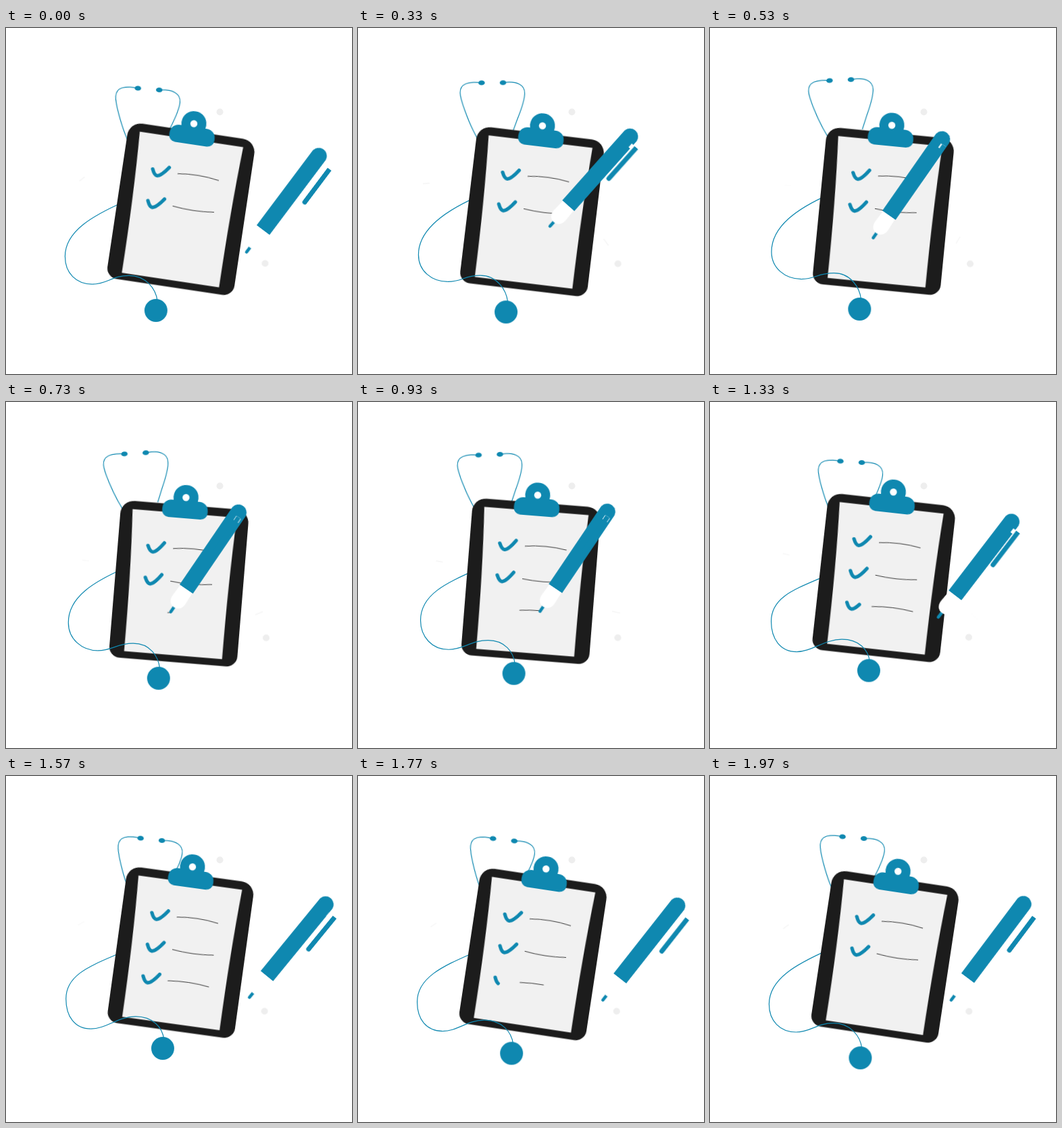
These frames come from a looping animation (512 by 512 pixels, 2000 ms). An HTML page without scripts:

```html
<!DOCTYPE html>
<html lang="en">
<head>
<meta charset="utf-8">
<title>Medical checklist</title>
<style>
@property --x { syntax: "<length>"; inherits: true; initial-value: 380px; }
@property --y { syntax: "<length>"; inherits: true; initial-value: 299px; }
@property --a { syntax: "<angle>"; inherits: true; initial-value: 37deg; }
@property --k { syntax: "<length>"; inherits: true; initial-value: 24px; }

html, body { margin: 0; width: 100%; height: 100%; overflow: hidden; background: #fff; }
svg { display: block; width: 100vw; height: 100vh; --blue: #0f88b0; }
.blue { fill: var(--blue); }
.tube { fill: none; stroke: var(--blue); stroke-width: 1.2; }
.rule { fill: none; stroke: #3a3a3a; stroke-width: 1; }
.check { fill: none; stroke: var(--blue); stroke-width: 5.2; stroke-linecap: round; stroke-linejoin: round; }
.dot { fill: #eee; }
.faint { stroke: #efefef; stroke-width: 1; }

/* Sine swings: one second each way, phase set by the delay */
.swing { animation: 1s cubic-bezier(.37,0,.63,1) infinite alternate; }
.bob { animation-name: bob; animation-delay: -1.6s; }
.tilt { animation-name: tilt; animation-delay: -.13s; transform-origin: 0 46px; }
.ears { animation-name: ears; animation-delay: -.3s; transform-origin: 96px 228px; }
.bellX { animation-name: bellX; animation-delay: -.72s; }
.bellY { animation-name: bellY; animation-delay: -1.77s; }
.drift { animation-name: drift; animation-delay: -1.4s; }
@keyframes bob { from { transform: translate(252.1px, 272.4px); } to { transform: translate(252.1px, 260.8px); } }
@keyframes tilt { from { transform: rotate(8.7deg); } to { transform: rotate(4.5deg); } }
@keyframes ears { from { transform: rotate(5.75deg); } to { transform: rotate(-4.2deg); } }
@keyframes bellX { from { transform: translateX(235px); } to { transform: translateX(219px); } }
@keyframes bellY { from { transform: translateY(420.9px); } to { transform: translateY(396.8px); } }
@keyframes drift { from { transform: translate(2px, .5px); } to { transform: translate(-.5px, -.5px); } }

.loop { animation: loop 2s linear infinite; }
@keyframes loop {
  0%, 100% { d: path("M175 257C130 277 87.4 300 87.4 338C87.4 363 104 379 127.6 379.2"); }
  12.5% { d: path("M175 252C130 272 88.8 299 88.8 337C88.8 361 108 377 131.7 376.9"); }
  25% { d: path("M175 247C130 267 90.8 294 90.8 332C90.8 356 111 372 135.1 372.1"); }
  37.5% { d: path("M175 246C130 266 92.4 288 92.4 326C92.4 350 112 367.5 135.9 367.5"); }
  50% { d: path("M175 249C130 269 92.6 284 92.6 322C92.6 347 109 366 133.4 365.8"); }
  62.5% { d: path("M175 254C130 274 91.2 285 91.2 323C91.2 349 105 368 129.3 368.1"); }
  75% { d: path("M175 259C130 279 89.2 290 89.2 328C89.2 354 102 373 125.9 372.9"); }
  87.5% { d: path("M175 260C130 280 87.6 296 87.6 334C87.6 360 101 377.5 125.1 377.5"); }
}
.lead { animation: lead 2s linear infinite; }
@keyframes lead {
  0%, 100% { d: path("M127.6 379.2C150 379 157 366.3 182 366.3S222 386 224 404"); }
  12.5% { d: path("M131.7 376.9C154 377 155 367.5 180 367.5S219 389 221 407"); }
  25% { d: path("M135.1 372.1C157 372 158 363.5 182.7 363.5S221 385 223 403"); }
  37.5% { d: path("M135.9 367.5C158 367.5 163 356.7 188.5 356.7S226 376 228 394"); }
  50% { d: path("M133.4 365.8C155 366 169 351.1 194 351.1S232 368 234 386"); }
  62.5% { d: path("M129.3 368.1C151 368 171 349.9 196 349.9S235 365 237 383"); }
  75% { d: path("M125.9 372.9C148 373 168 353.9 193.3 353.9S233 369 235 387"); }
  87.5% { d: path("M125.1 377.5C147 377.5 162 360.7 187.5 360.7S228 378 230 396"); }
}

.pen {
  transform: translate(var(--x), var(--y)) rotate(var(--a));
  animation: penX 2s infinite, penY 2s infinite, penA 2s infinite, penK 2s infinite;
}
.clip { transform: translateX(var(--k)); }
.link { transform: translateX(calc(var(--k) * .64 - 2.7px)); }
@keyframes penX {
  0% { --x: 380.5px; animation-timing-function: cubic-bezier(.33,.05,.67,.57); }
  16.5% { --x: 311.5px; animation-timing-function: cubic-bezier(.33,.39,.67,.81); }
  26.5% { --x: 265px; animation-timing-function: cubic-bezier(.33,.76,.67,1); }
  30% { --x: 261px; animation-timing-function: cubic-bezier(.33,0,.67,.43); }
  46.5% { --x: 292px; animation-timing-function: cubic-bezier(.33,.3,.67,.62); }
  56.5% { --x: 327px; animation-timing-function: cubic-bezier(.33,.5,.67,.9); }
  78.5% { --x: 386px; animation-timing-function: cubic-bezier(.33,.7,.67,1); }
  85% { --x: 388.3px; animation-timing-function: cubic-bezier(.33,0,.67,.63); }
  100% { --x: 380.5px; }
}
@keyframes penY {
  0% { --y: 299px; animation-timing-function: cubic-bezier(.37,.1,.63,1); }
  15% { --y: 262.5px; animation-timing-function: cubic-bezier(.4,0,.6,1); }
  28% { --y: 277.5px; animation-timing-function: ease-in-out; }
  46.5% { --y: 276px; animation-timing-function: ease-in; }
  56.5% { --y: 278px; animation-timing-function: cubic-bezier(.33,.2,.67,.8); }
  78.5% { --y: 296px; animation-timing-function: cubic-bezier(.33,.6,.67,1); }
  90% { --y: 299.6px; animation-timing-function: ease-in-out; }
  100% { --y: 299px; }
}
@keyframes penA {
  0% { --a: 36.9deg; animation-timing-function: ease-in-out; }
  15% { --a: 42deg; animation-timing-function: ease-in-out; }
  26.5% { --a: 34.9deg; animation-timing-function: ease-out; }
  46.5% { --a: 34deg; animation-timing-function: ease-in; }
  56.5% { --a: 35.2deg; animation-timing-function: cubic-bezier(.33,.3,.67,1); }
  78.5% { --a: 39.3deg; animation-timing-function: ease-in-out; }
  100% { --a: 36.9deg; }
}
@keyframes penK {
  0% { --k: 24.5px; animation-timing-function: ease-in; }
  16.5% { --k: 18px; animation-timing-function: linear; }
  26.5% { --k: 8px; animation-timing-function: ease-out; }
  38% { --k: 4px; animation-timing-function: ease-in; }
  46.5% { --k: 4.4px; animation-timing-function: ease-in; }
  56.5% { --k: 10px; animation-timing-function: cubic-bezier(.33,.45,.67,.85); }
  78.5% { --k: 22.5px; animation-timing-function: ease-out; }
  100% { --k: 24.5px; }
}

.draw { stroke-dasharray: 1 2; stroke-dashoffset: 1.2; }
.last { animation: last 2s infinite; }
.tick { animation: tick 2s infinite; }
@keyframes last {
  0%, 30% { stroke-dashoffset: 1; animation-timing-function: cubic-bezier(.33,0,.67,.43); }
  46.5% { stroke-dashoffset: .53; animation-timing-function: cubic-bezier(.33,.3,.67,.62); }
  56.5%, 84% { stroke-dashoffset: 0; animation-timing-function: ease-in-out; }
  94%, 100% { stroke-dashoffset: 1; }
}
@keyframes tick {
  0%, 59% { stroke-dashoffset: 1.2; animation-timing-function: ease-in-out; }
  70%, 83% { stroke-dashoffset: 0; animation-timing-function: ease-in-out; }
  93%, 100% { stroke-dashoffset: 1.2; }
}

.glintA { animation: glintA 2s linear infinite; }
.glintB { animation: glintB 2s linear infinite; }
@keyframes glintA {
  0%, 100% { transform: translate(112.5px, 223.5px) rotate(-38deg); }
  16.5% { transform: translate(101px, 230px) rotate(-5deg); opacity: 1; }
  26.5% { transform: translate(115px, 233px) rotate(5deg); opacity: .2; }
  46.5% { transform: translate(120.5px, 236px) rotate(10deg); opacity: 1; }
  56.5% { transform: translate(114px, 231.5px) rotate(48deg); opacity: 1; }
  78.5% { transform: translate(111px, 218px) rotate(-30deg); opacity: .5; }
}
@keyframes glintB {
  0%, 8% { transform: translate(367px, 318px) rotate(70deg); opacity: 0; }
  16.5% { transform: translate(367px, 317px) rotate(55deg); opacity: 1; }
  26.5% { transform: translate(367px, 314px) rotate(-60deg); opacity: .8; }
  46.5% { transform: translate(382px, 311px) rotate(13deg); opacity: 1; }
  56.5% { transform: translate(390px, 315px) rotate(37deg); opacity: 1; }
  68%, 100% { transform: translate(392px, 318px) rotate(45deg); opacity: 0; }
}
</style>
</head>
<body>
<svg viewBox="0 0 512 512">
  <defs>
    <path id="check" class="check" d="M-50.3 -53.4Q-46.5 -44.2 -42.3 -44.5Q-36.5 -45.2 -26.4 -59.2"/>
  </defs>

  <circle class="dot" cx="316.5" cy="124.3" r="5"/>
  <g class="swing drift"><circle class="dot" cx="383" cy="348.5" r="5"/></g>
  <path class="faint glintA" d="M-5 0H5"/>
  <path class="faint glintB" d="M-6 0H6"/>

  <!-- stethoscope, behind the board -->
  <g class="swing ears">
    <path class="tube" d="M186 83C166 80 154 84 154 97C154 108 165 138 172 153L184 178M218 83.5C238 81 250 87 249.5 100C249 113 241 130 237 140L230 158"/>
    <ellipse class="blue" cx="186" cy="83" rx="4.8" ry="3.6"/>
    <ellipse class="blue" cx="217.7" cy="83.5" rx="4.8" ry="3.6"/>
  </g>
  <path class="tube loop" d="M175 257C130 277 87.4 300 87.4 338C87.4 363 104 379 127.6 379.2"/>

  <!-- clipboard -->
  <g class="swing bob"><g class="swing tilt">
    <path fill="#1c1c1c" d="M-75 -117.5H75A20 20 0 0 1 95 -97.5V99.5A16 16 0 0 1 79 115.5H-79A16 16 0 0 1 -95 99.5V-97.5A20 20 0 0 1 -75 -117.5Z"/>
    <path fill="#f1f1f1" d="M-77.4 -105.3H77.4Q72.5 -10 72.7 105.3H-72.7Q-72 -10 -77.4 -105.3Z"/>
    <circle class="blue" cy="-128.8" r="18.5"/>
    <path class="blue" d="M-20.5 -124H20.5A13.2 13.2 0 0 1 33.7 -110.8V-108A10 10 0 0 1 23.7 -98H-23.7A10 10 0 0 1 -33.7 -108V-110.8A13.2 13.2 0 0 1 -20.5 -124Z"/>
    <circle cy="-128.8" r="5.2" fill="#fff"/>
    <use href="#check"/>
    <use href="#check" y="47.3"/>
    <path class="check draw tick" pathLength="1" d="M-50.3 41.2Q-46.5 50.4 -42.3 50.1Q-36.5 49.4 -26.4 35.4"/>
    <path class="rule" d="M-13 -52Q18 -56.5 49 -51"/>
    <path class="rule" d="M-13 -3.6Q18 .4 49 -3.6"/>
    <path class="rule draw last" pathLength="1" d="M-13.4 43.2Q18 39.4 48.4 44"/>
  </g></g>

  <!-- stethoscope, in front -->
  <path class="tube lead" d="M127.6 379.2C150 379 157 366.3 182 366.3S222 386 224 404"/>
  <g class="swing bellX"><g class="swing bellY"><circle class="blue" r="17"/></g></g>

  <g class="pen">
    <path class="blue" d="M-2.3 30V40.7a2.3 2.3 0 0 0 4.6 0V30z"/>
    <path fill="#fff" d="M-10.6 -1L-11.5 19C-11.5 28 -6 32.5 0 32.5S11.5 28 11.5 19L10.6 -1Z"/>
    <path class="blue" d="M-11.9 0V-137a11.9 11.9 0 0 1 23.8 0V0z"/>
    <rect class="link" y="-131.2" width="8.5" height="7.2" fill="#fff"/>
    <path class="blue clip" d="M-3.5 -131h7v61a3.5 3.5 0 0 1 -7 0z"/>
  </g>
</svg>
</body>
</html>
```
